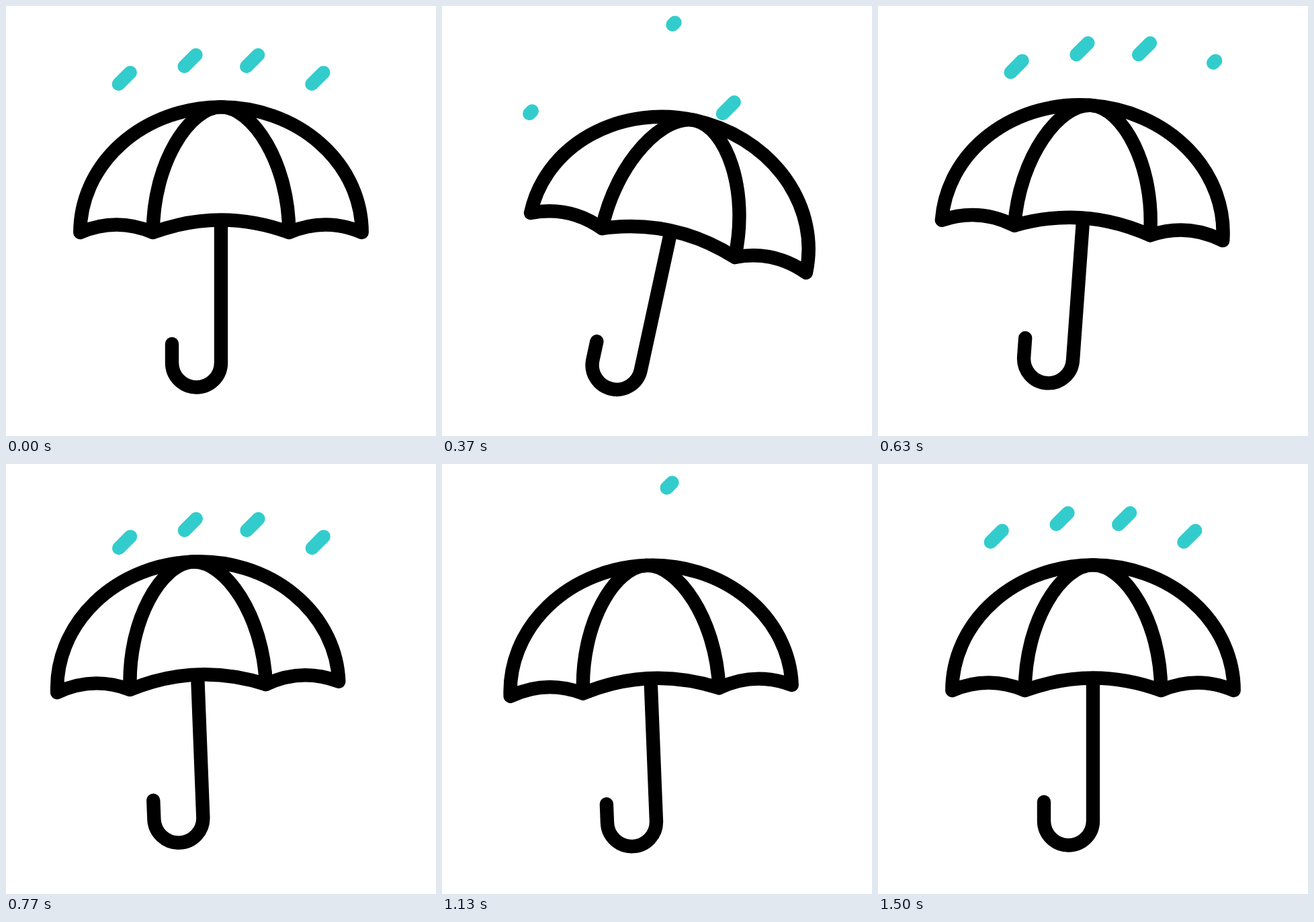
Write an HTML page that moves like this. It is 640x640 px and loops after 1.67 s.

```html
<!DOCTYPE html>
<html lang="en">
<head>
<meta charset="utf-8">
<title>Umbrella in the rain</title>
<style>
  html, body { margin: 0; height: 100%; overflow: hidden; background: #fff; }
  svg { display: block; width: 100%; height: 100%; }
  path { fill: none; stroke-linecap: round; stroke-linejoin: round; }
  #umbrella path { stroke: #000; stroke-width: 20.4; }
  #rain { stroke: #3cc; stroke-width: 20; }
</style>
</head>
<body>
<svg viewBox="0 0 640 640">
  <g id="umbrella">
    <path d="M110.3 337A209.7 186.6 0 0 1 529.7 337Q475.5 314 421.2 337Q320 300 218.8 337Q164.5 314 110.3 337Z"/>
    <path d="M218.8 337C218.8 234 273 150.4 320 150.4S421.2 234 421.2 337"/>
    <path d="M320 319V531A36.5 36.5 0 0 1 247 531V503"/>
  </g>
  <path id="rain"/>
</svg>
<script>
const LOOP = 1670, TICK = 100 / 3, END = 45;
const umbrella = document.getElementById('umbrella');
const rain = document.getElementById('rain');

const clamp = u => Math.min(1, Math.max(0, u));
const ramp = (tick, from, to) => clamp((tick - from) / (to - from));
const smooth = u => u * u * (3 - 2 * u);
const easeIn = u => u ** 1.88;
const easeOut = u => 1 - (1 - u) ** 2;
const mix = (a, b, p) => a + (b - a) * p;
const mixPoint = (a, b, p) => a.map((v, i) => mix(v, b[i], p));
const curve = (a, bend, b, p) => mixPoint(mixPoint(a, bend, p), mixPoint(bend, b, p), p);

// The umbrella is blown right, swings back left, then settles
const HOME = [0, 0], RIGHT = [21.3, 16], LEFT = [-36, -5];

function position(tick) {
  if (tick < 12) return curve(HOME, [2, 13.5], RIGHT, smooth(tick / 12));
  if (tick < 24) return curve(RIGHT, [-8, -7], LEFT, smooth(ramp(tick, 12, 24)));
  return curve(LEFT, [-17, 2], HOME, easeOut(ramp(tick, 24, END)));
}

function tilt(tick) {
  return 12.5 * smooth(ramp(tick, 0, 12))
    - 16.7 * smooth(ramp(tick, 12, 26))
    + 4.2 * smooth(ramp(tick, 26, 43));
}

// Lower end of each drop, in the order they appear and vanish
const drops = [[265.4, 90], [358, 90], [167.6, 116.3], [455.2, 116.3]];
const DASH = 17.3, ENTRY = [64, -48.2], EXIT = [-41, 46];

// grow and shrink: when the first drop starts to appear and to vanish
const showers = [
  { from: 0, to: 11, a: HOME, b: [-37.5, 44], ease: easeIn, grow: -20, shrink: 5.3 },
  { from: 11, to: 32, a: ENTRY, b: EXIT, ease: smooth, grow: 10.4, shrink: 23.8 },
  { from: 32, to: END, a: ENTRY, b: HOME, ease: smooth, grow: 32.6, shrink: 99 }
];

function rainPath(tick) {
  let d = '';
  for (const { from, to, a, b, ease, grow, shrink } of showers) {
    const [dx, dy] = mixPoint(a, b, ease(ramp(tick, from, to)));
    drops.forEach(([x, y], i) => {
      // A drop grows from its top end and shrinks towards its lower end
      const growAt = grow + i * 2.67, shrinkAt = shrink + i * 2;
      const low = DASH * (1 - ramp(tick, growAt, growAt + 3));
      const high = DASH * (1 - ramp(tick, shrinkAt, shrinkAt + 2.2));
      if (high > low) d += `M${x + dx + low} ${y + dy - low}L${x + dx + high} ${y + dy - high}`;
    });
  }
  return d;
}

function draw(ms) {
  const tick = Math.min(END, Math.floor((ms % LOOP + 5) / TICK));
  umbrella.setAttribute('transform', `translate(${position(tick)}) rotate(${tilt(tick)} 320 320)`);
  rain.setAttribute('d', rainPath(tick));
}

const start = performance.now();
function loop() {
  draw(performance.now() - start);
  requestAnimationFrame(loop);
}
loop();
</script>
</body>
</html>
```
